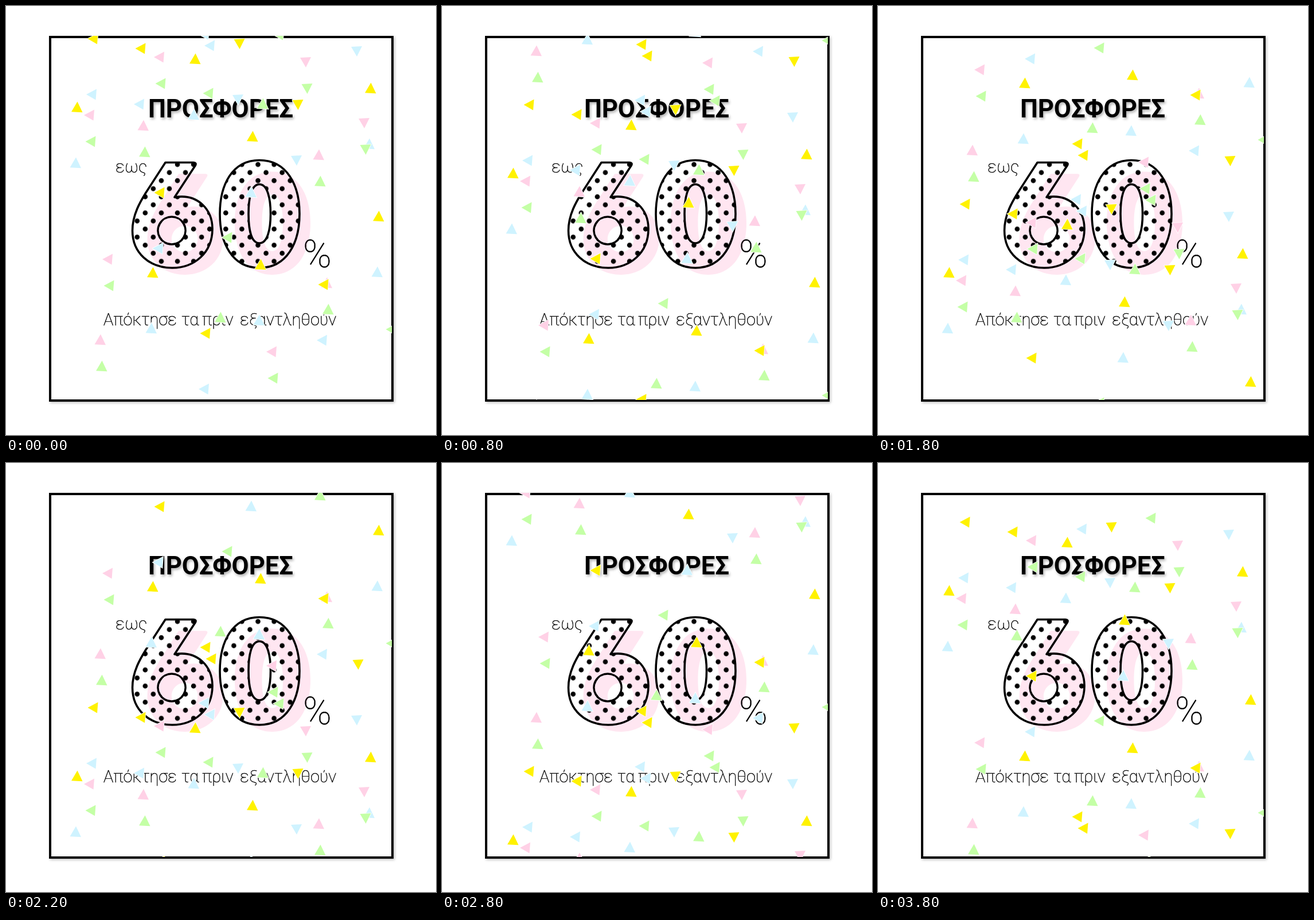
An HTML page for the animation above (4000 ms loop, 750 by 747 pixels).

```html
<!DOCTYPE html>
<html lang="el">
<head>
<meta charset="utf-8">
<title>Προσφορές</title>
<style>
  html, body { margin: 0; width: 100%; height: 100%; overflow: hidden; background: #fff; }
  svg { display: block; width: 100%; height: 100%; }
  .frame { fill: #fff; stroke: #000; stroke-width: 4; filter: drop-shadow(2px 2px 2px rgba(0,0,0,.25)); }
  .title { font: 700 43.6px Roboto, Inter, sans-serif; text-anchor: middle; filter: drop-shadow(2px 3px 2px rgba(0,0,0,.3)); }
  .thin { font: 100 29px Roboto, "Open Sans", sans-serif; stroke: #000; stroke-width: .45; }
  .thin.percent { font-size: 67px; text-anchor: middle; }
  .digits { fill: url(#dots); fill-rule: evenodd; stroke: #000; stroke-width: 3.6; stroke-linejoin: round; }
  .shade { fill: #ffe6f1; fill-rule: evenodd; }
  #confetti path { stroke: #fff; stroke-width: 1.6; paint-order: stroke; }
</style>
</head>
<body>
<svg viewBox="0 0 750 747" xmlns="http://www.w3.org/2000/svg">
  <defs>
    <pattern id="dots" x="292" y="269" width="28.1" height="28.1" patternUnits="userSpaceOnUse">
      <circle cx="7" cy="7" r="4.3"/>
      <circle cx="21.05" cy="21.05" r="4.3"/>
    </pattern>
    <clipPath id="area"><rect x="77" y="52" width="596" height="634"/></clipPath>
    <path id="six" d="M278 272.500H327Q333 273 330 278L294 333C335 326 360 355 360 388C360 430 328 456 290 456C250 456 220.500 430 220.500 391C220.500 362 236 338 244 325Z
      M289 367a24 24 0 1 0 .01 0Z"/>
    <path id="zero" d="M442 268.500C490 268.500 512 312 512 362S490 456 442 456S373 412 373 362S394 268.500 442 268.500Z
      M442 310.500C456 310.500 461.500 335 461.500 362S456 413 442 413S423 390 423 362S428 310.500 442 310.500Z"/>
  </defs>

  <rect class="frame" x="77" y="54" width="597" height="633"/>
  <text class="title" x="374.500" y="194">ΠΡΟΣΦΟΡΕΣ</text>
  <text class="thin" x="191" y="290">εως</text>

  <g class="shade">
    <use href="#six" transform="translate(37 31.500) scale(.95 .957)"/>
    <use href="#zero" transform="translate(44.600 31.500) scale(.95 .957)"/>
  </g>
  <g class="digits" role="img" aria-label="60">
    <use href="#six"/>
    <use href="#zero"/>
  </g>
  <text class="thin percent" x="543" y="455">%</text>

  <text class="thin" y="556"><tspan x="170">Απόκτησε</tspan> <tspan x="306">τα</tspan> <tspan x="342">πριν</tspan> <tspan x="408">εξαντληθούν</tspan></text>

  <g id="confetti" clip-path="url(#area)"></g>
</svg>
<script>
const STEP = 200, FRAMES = 20, TILE = 618;

// Triangles pointing left, up and down, drawn around their centre
const L = 'm-9.5 0l18-9.5l-1.5 19z';
const U = 'm.5-9.5l-10.5 17.7l19.5 1.100z';
const D = 'm-9.5-8l19-1l-9 18z';

// One scatter, shared by every colour; the sparse colour uses its first part
const sparse = [
  [152, 57, L], [30, 158, L], [124, 176, U], [430, 227, U], [407, 66, D],
  [62, 409, L], [444, 450, U], [49, 549, U], [348, 570, L], [509, 172, D]
];
const full = [
  ...sparse,
  [235, 74, L], [330, 92, U], [268, 325, L], [256, 464, U], [554, 485, L],
  [358, -28, L], [636, 143, U], [650, 366, U], [614, -18, D]
];

const layers = [
  { fill: '#ffd1e6', points: sparse, dx: 115.5, dy: 32 },
  { fill: '#cff3ff', points: full, dx: -2.5, dy: 97 },
  { fill: '#c4ffa6', points: full, dx: 118, dy: 78 },
  { fill: '#fff200', points: full, dx: 0, dy: 0 }
];

// The fall is uneven: key points of [frame, distance]
const fall = [[0, 0], [4, 115], [6, 209], [9, 288], [12, 409], [16, 550], [19, 664]];

function distance(frame) {
  const i = Math.max(1, fall.findIndex(key => key[0] >= frame));
  const [f0, d0] = fall[i - 1], [f1, d1] = fall[i];
  return Math.round(d0 + (d1 - d0) * (frame - f0) / (f1 - f0));
}

// Two tiles: one on the stage at the start, one entering from above
const outline = ({ points, dx, dy }, shift) =>
  [shift, shift - TILE].flatMap(top =>
    points.map(([x, y, shape]) => `M${x + dx} ${y + dy + top}${shape}`)).join('');

const confetti = document.getElementById('confetti');
for (const layer of layers) {
  layer.path = document.createElementNS('http://www.w3.org/2000/svg', 'path');
  layer.path.setAttribute('fill', layer.fill);
  confetti.append(layer.path);
}

const start = performance.now();
function draw() {
  const frame = Math.floor((performance.now() - start) / STEP) % FRAMES;
  const shift = distance(frame);
  for (const layer of layers) layer.path.setAttribute('d', outline(layer, shift));
  requestAnimationFrame(draw);
}
draw();
</script>
</body>
</html>
```
